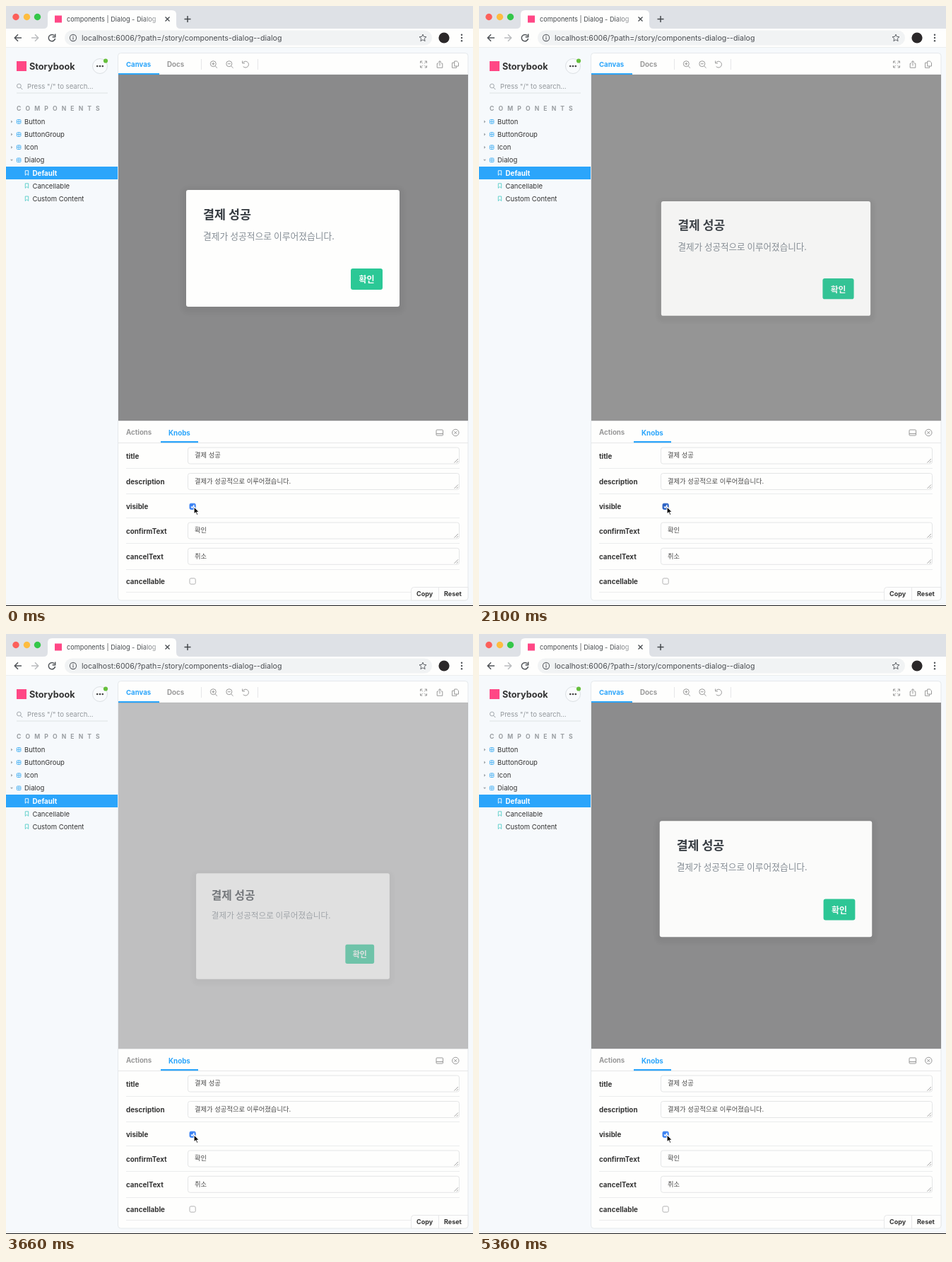
Write an HTML page with a canvas that moves like this. It is 661 px wide and 848 px high and loops after 5400 ms.

```html
<!DOCTYPE html>
<html lang="en">
<head>
<meta charset="utf-8">
<title>Dialog story</title>
<style>
  html, body { margin: 0; width: 100%; height: 100%; overflow: hidden; background: #f6f9fc; }
  canvas { position: absolute; left: 0; top: 0; }
  #preview { position: absolute; left: 159px; top: 97px; width: 495px; height: 489px; overflow: hidden; }
  #dim { position: absolute; inset: 0; background: #8a8a8b; }
  #dialog {
    position: absolute; left: 96px; top: 163px; width: 302px; height: 165px;
    background: #fefefd; border-radius: 3px; box-shadow: 0 3px 6px 6px rgba(0, 0, 0, .05);
    font-family: "Noto Sans CJK KR", "Noto Sans CJK", sans-serif; white-space: nowrap;
  }
  #dialog > * { position: absolute; margin: 0; }
  #dialog h3 { left: 24px; top: 22px; font-size: 17.4px; line-height: 24px; color: #343a40; }
  #dialog p { left: 24px; top: 55px; font-size: 12.8px; line-height: 20px; color: #868e96; }
  #dialog b {
    left: 233px; top: 110.5px; width: 45px; height: 30px; border-radius: 3px; background: #2bc896;
    color: #fff; font-size: 12px; line-height: 29px; text-align: center;
  }
</style>
</head>
<body>
<canvas id="stage" width="661" height="848"></canvas>
<div id="preview">
  <div id="dim"></div>
  <div id="dialog"><h3>결제 성공</h3><p>결제가 성공적으로 이루어졌습니다.</p><b>확인</b></div>
</div>
<script>
const LOOP = 5400, FADE = 450;
const BLUE = '#2ba5fb', GREY = '#999', INK = '#333', PAPER = '#fefefd', LINE = '#e6e7e8', PINK = '#ff4785';
// Each click: mouse down, checkbox toggles, dialog reacts, new state
const clicks = [
  [375, 630, 930, 0], [1270, 1430, 1765, 1], [2070, 2230, 2565, 0],
  [2590, 3160, 3495, 1], [3800, 3975, 4310, 0], [4480, 4630, 4966, 1]
];
const ctx = document.getElementById('stage').getContext('2d');
const dim = document.getElementById('dim');
const dialog = document.getElementById('dialog');
const clamp = v => Math.max(0, Math.min(1, v));

// cubic-bezier(0, 0, .58, 1)
function easeOut(x) {
  if (x <= 0 || x >= 1) return clamp(x);
  let lo = 0, hi = 1, u;
  for (let i = 0; i < 24; i++) {
    u = (lo + hi) / 2;
    if (1.74 * u * u - 0.74 * u ** 3 < x) lo = u; else hi = u;
  }
  return 3 * u * u - 2 * u ** 3;
}

function rect(x, y, w, h, fill) { ctx.fillStyle = fill; ctx.fillRect(x, y, w, h); }

function box(x, y, w, h, r, fill, stroke, width = 1) {
  ctx.beginPath();
  ctx.roundRect(x, y, w, h, r);
  if (fill) { ctx.fillStyle = fill; ctx.fill(); }
  if (stroke) { ctx.strokeStyle = stroke; ctx.lineWidth = width; ctx.stroke(); }
}

function circle(x, y, r, fill, stroke, width = 1) {
  box(x - r, y - r, 2 * r, 2 * r, r, fill, stroke, width);
}

function path(d, x, y, stroke, width = 1, fill) {
  ctx.save();
  ctx.translate(x, y);
  const shape = new Path2D(d);
  if (fill) { ctx.fillStyle = fill; ctx.fill(shape); }
  if (stroke) { ctx.strokeStyle = stroke; ctx.lineWidth = width; ctx.stroke(shape); }
  ctx.restore();
}

// y is the middle of the capital letters
function text(s, x, y, size, color = INK, weight = 400, spacing = 0) {
  ctx.font = `${weight} ${size}px Inter, "Noto Sans CJK KR", "Noto Sans CJK", sans-serif`;
  ctx.letterSpacing = spacing + 'px';
  ctx.fillStyle = color;
  ctx.fillText(s, x, y + size * 0.36);
}

function drawBrowser() {
  rect(0, 0, 661, 32, '#dee1e6');
  circle(14, 15.5, 4.7, '#fc605b');
  circle(29.5, 15.5, 4.7, '#fdbc40');
  circle(44.5, 15.5, 4.7, '#34c749');
  path('M53 32Q59 32 59 26V12Q59 6 65 6H235Q241 6 241 12V26Q241 32 247 32Z', 0, 0, null, 0, PAPER);
  rect(69, 13.5, 10, 10, PINK);
  const fade = ctx.createLinearGradient(192, 0, 213, 0);
  fade.addColorStop(0, '#45494d');
  fade.addColorStop(1, '#a5a8ab');
  text('components | Dialog - Dialog', 86, 18.5, 9.2, fade);
  path('M-3-3L3 3M3-3L-3 3', 228.5, 18.5, '#45494d', 1.3);
  path('M-4.5 0H4.5M0-4.5V4.5', 257, 18.5, '#45494d', 1.5);

  rect(0, 32, 661, 27, PAPER);
  path('M5 0H-4.5M0-4.7L-4.7 0L0 4.7', 17, 45, '#505458', 1.5);
  path('M-5 0H4.5M0-4.7L4.7 0L0 4.7', 41, 45, '#babcbe', 1.5);
  path('M3.5-3A4.7 4.7 0 1 0 4.6 1M4.7-5.4V-1.3H.6', 65, 45, '#505458', 1.5);
  box(83, 34.5, 520, 21, 10.5, '#f1f3f4');
  circle(95, 45, 4.6, null, '#5f6368', 1.1);
  rect(94.4, 44.2, 1.2, 3.3, '#5f6368');
  rect(94.4, 42.2, 1.2, 1.2, '#5f6368');
  text('localhost:6006/?path=/story/components-dialog--dialog', 107, 45, 10.6, '#4a4d51');
  path('M0-5L1.4-1.7L5-1.4L2.3 1L3.1 4.6L0 2.7L-3.1 4.6L-2.3 1L-5-1.4L-1.4-1.7Z', 590, 45, '#5f6368', 1);
  circle(620, 45, 7.6, '#2b2829');
  for (const y of [40.7, 45, 49.3]) circle(645, y, 1.2, '#505458');
  rect(0, 58.5, 661, 1, '#dcdfe2');
}

function drawTreeRow(name, y, open) {
  path(open ? 'M-2-1H2L0 1.5Z' : 'M-1-2L1.5 0L-1 2Z', 8, y, null, 0, '#a3a9ae');
  box(15.3, y - 2.8, 5.6, 5.6, 1, null, '#4fb4f4', 1);
  path('M-2.8 0H2.8M0-2.8V2.8', 18.1, y, '#4fb4f4', 0.9);
  text(name, 26, y, 9.5);
}

function drawStory(name, y, selected) {
  if (selected) rect(0, y - 9, 159, 18, BLUE);
  path('M-2.2-3.3H2.2V3.2L0 1.2L-2.2 3.2Z', 29.5, y, selected ? '#fff' : '#54cdc8', 0.9);
  text(name, 37.5, y, selected ? 9.8 : 9.53, selected ? '#fff' : INK, selected ? 700 : 400);
}

function drawSidebar() {
  rect(0, 59, 661, 789, '#f6f9fc');
  rect(15, 78, 14, 14, PINK);
  text('Storybook', 33, 85, 12.7, INK, 700);
  circle(133, 85, 10.5, '#f9fbfd', '#d9dde0', 0.9);
  for (const x of [129.2, 133, 136.8]) circle(x, 85, 1.3, '#444');
  circle(141, 77.5, 3.1, '#66bf3c');
  circle(18.4, 113, 2.9, null, '#999fa4', 0.9);
  path('M0 0L2.8 2.8', 20.5, 115.2, '#999fa4', 1);
  text('Press "/" to search...', 30, 114, 9.6, '#92979b');
  rect(15, 122.5, 129, 1, '#dfe3e6');
  text('COMPONENTS', 15, 145, 8.6, '#999da1', 700, 6.1);
  ['Button', 'ButtonGroup', 'Icon', 'Dialog'].forEach((name, i) => drawTreeRow(name, 163.4 + i * 18.15, i === 3));
  ['Default', 'Cancellable', 'Custom Content'].forEach((name, i) => drawStory(name, 236 + i * 18.15, i === 0));
}

function drawMagnifier(x, plus) {
  circle(x - 0.7, 81.7, 4, null, GREY, 1);
  path(`M2.2 2.7L5 5.5M-2.7-.5H1.3${plus ? 'M-.7-2.5V1.5' : ''}`, x, 82.2, GREY, 1);
}

function drawMainPanel() {
  box(158.5, 66.5, 495.5, 773.5, 4, PAPER, '#e5e9ec');
  rect(159, 96.5, 495, 1, LINE);
  text('Canvas', 170, 82.5, 9.6, BLUE, 700);
  text('Docs', 228, 82.5, 9.7, GREY, 700);
  rect(159, 95, 58, 2.2, BLUE);
  rect(276, 75, 1, 15, LINE);
  rect(356, 75, 1, 15, LINE);
  drawMagnifier(294, true);
  drawMagnifier(316.5, false);
  path('M-3.6-2.4A4.4 4.4 0 1 1-3.3 3M-4.4-5V-1.6H-1', 339, 82.5, GREY, 1);
  path('M-4.5-1.7V-4.5H-1.7M1.7-4.5H4.5V-1.7M4.5 1.7V4.5H1.7M-1.7 4.5H-4.5V1.7' +
    'M-4.5-4.5L-1.2-1.2M4.5-4.5L1.2-1.2M4.5 4.5L1.2 1.2M-4.5 4.5L-1.2 1.2', 591, 82.5, GREY, 1);
  path('M-2-1.3H-3.8V4.7H3.8V-1.3H2M0 2V-4.7M-2.2-2.6L0-4.9L2.2-2.6', 614, 82.5, GREY, 1);
  path('M-1.3-4.5H2.3L4.5-2.3V2.5H-1.3ZM-1.3-2.3H-4.5V4.8H1.7V2.5', 636, 82.5, GREY, 1);

  rect(159, 586, 495, 1, LINE);
  rect(159, 617, 495, 1, LINE);
  text('Actions', 170, 603, 9.7, GREY, 700);
  text('Knobs', 230, 603, 9.8, BLUE, 700);
  rect(219, 615, 53, 2.2, BLUE);
  box(609, 599, 9.5, 8, 1, null, GREY, 1);
  rect(609, 604, 9.5, 1, GREY);
  circle(636.3, 603, 4.7, null, GREY, 1);
  path('M-1.9-1.9L1.9 1.9M1.9-1.9L-1.9 1.9', 636.3, 603, GREY, 1);
}

function drawField(label, value, y) {
  text(label, 170, y + 0.5, 9.8, INK, 700);
  box(257.5, y - 11.5, 384, 23, 3, PAPER, '#e4e5e6');
  text(value, 267, y - 0.5, 9.3, '#4b4b4b');
  path('M-5.5 0L0-5.5M-2.3 0L0-2.3', 640, y + 10, '#8b8b8b', 0.8);
}

function drawCheckbox(label, y, checked, pressed) {
  text(label, 170, y, 9.8, INK, 700);
  const fill = checked ? (pressed ? '#2b62c4' : '#3b82f3') : (pressed ? '#dedede' : '#fff');
  box(260, y - 4.1, 8.2, 8.2, 1.8, fill, checked ? fill : '#a9a9a9', 0.9);
  if (checked) path('M-2.2.2L-.6 1.9L2.3-2.2', 264.1, y, '#fff', 1.3);
}

function drawKnobs(t, checked, pressed) {
  for (const y of [653, 689, 723, 759, 796, 828]) rect(170, y, 472, 1, '#ebeced');
  drawField('title', '결제 성공', 635.5);
  drawField('description', '결제가 성공적으로 이루어졌습니다.', 672);
  drawCheckbox('visible', 707.3, checked, pressed);
  drawField('confirmText', '확인', 741.5);
  drawField('cancelText', '취소', 777.8);
  drawCheckbox('cancellable', 813, false, false);

  const bar = Math.min(clamp((t - 350) / 50), clamp((1600 - t) / 100));
  if (bar) box(647, 619, 5, 202, 2.5, `rgba(153,153,153,${bar * 0.5})`);

  box(573.5, 821.5, 80.5, 18.5, [4, 0, 4, 0], PAPER, LINE);
  rect(612, 822, 1, 18, LINE);
  text('Copy', 581, 831, 9, INK, 700);
  text('Reset', 620, 831, 9, INK, 700);
  path('M0 0V10.8L2.5 8.5L4.2 12.2L6 11.4L4.4 7.8H7.7Z', 266, 707.5, '#fff', 1.2, '#000');
  rect(0, 847, 661, 1, '#1c1c1c');
}

function render(t) {
  let checked = 1, pressed = false, shown = 1;
  for (const [down, toggle, react, state] of clicks) {
    if (t >= down && t < toggle) pressed = true;
    if (t >= toggle) checked = state;
    if (t >= react) {
      const e = easeOut((t - react) / FADE);
      shown = state ? e : 1 - e;
    }
  }
  drawBrowser();
  drawSidebar();
  drawMainPanel();
  drawKnobs(t, checked, pressed);
  dim.style.opacity = shown;
  dialog.style.opacity = shown;
  dialog.style.transform = `translateY(${151 * (1 - shown)}px) scale(${0.8 + 0.2 * shown})`;
}

const start = performance.now();
function tick() {
  render((performance.now() - start) % LOOP);
  requestAnimationFrame(tick);
}
tick();
</script>
</body>
</html>
```
